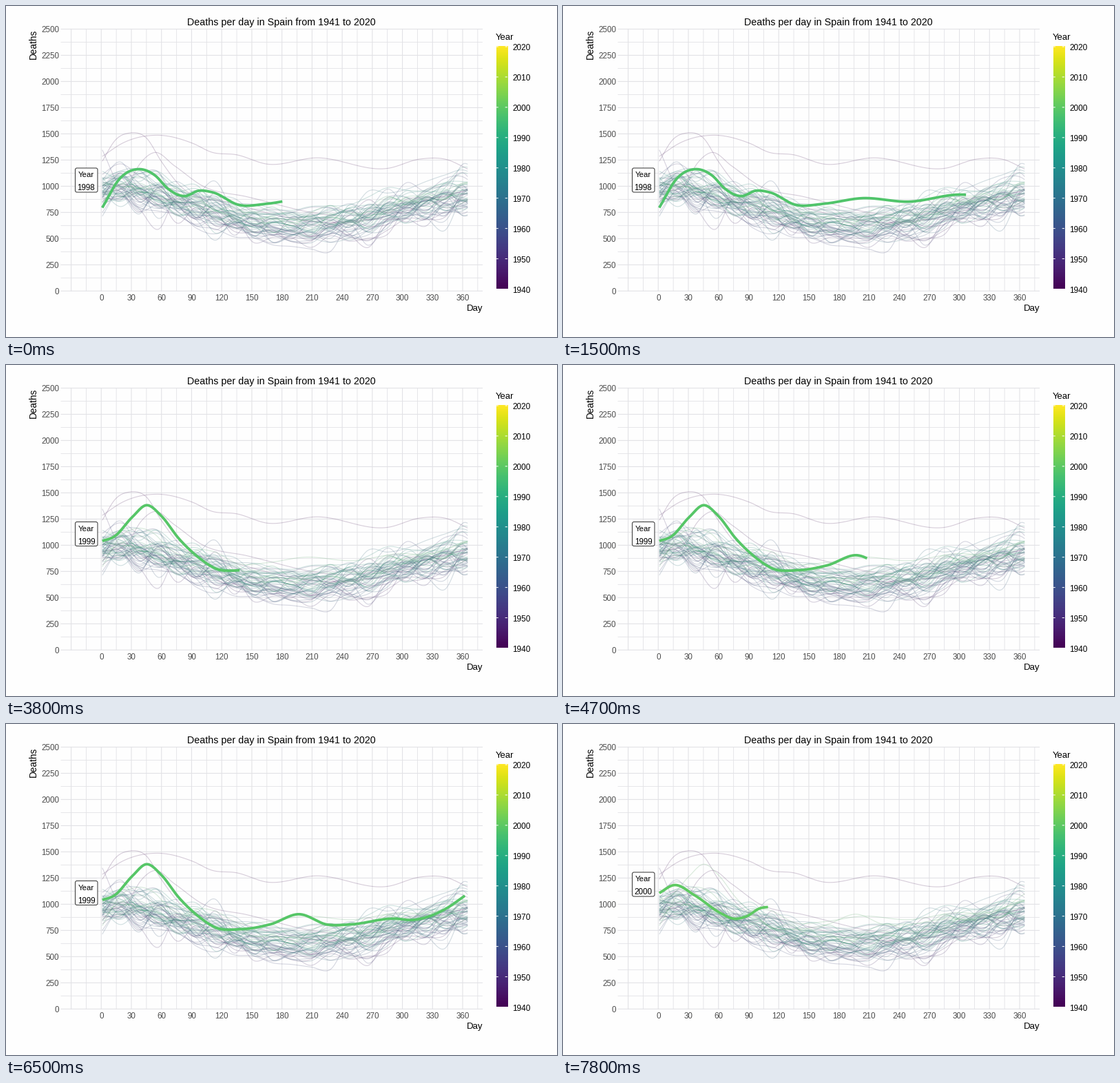
A matplotlib script that plays this animation: 800x480 px, repeating every 8 s.

```python
import numpy as np
import matplotlib.pyplot as plt
from matplotlib.animation import FuncAnimation
from matplotlib.collections import LineCollection
from matplotlib.patches import FancyBboxPatch

W, H, DPI = 800, 480, 100
PT = 72 / DPI                      # one pixel in points
LEFT, RIGHT, TOP, BOTTOM = 80, 691.5, 33.5, 413.3
BAR_LEFT, BAR_RIGHT, BAR_TOP, BAR_BOTTOM = 711.5, 728, 59, 410.5
FRAMES, INTERVAL = 80, 100
START_DAY, DAYS_PER_STEP = 180.4, 14.02
FIRST_YEAR, HERO_YEAR = 1941, 1998
GRID = "#e2e2e6"

plt.rcParams["font.family"] = "Liberation Sans"
viridis = plt.get_cmap("viridis")
days = np.arange(1, 366)


def px(day):
    return 138.3 + np.asarray(day) * 1.4575


def py(deaths):
    return BOTTOM - np.asarray(deaths) * 0.15192


def year_color(year):
    return np.array(viridis((year - 1940) / 80)[:3])


def faded(year):
    return (*(0.65 * year_color(year) + 0.35 * 0.45), 0.24)


def smooth(points, at=days):
    """Cubic Hermite curve through (day, deaths) points."""
    x, y = np.array(points, float).T
    m = np.gradient(y, x)
    i = np.clip(np.searchsorted(x, at, side="right") - 1, 0, len(x) - 2)
    h = x[i + 1] - x[i]
    t = (at - x[i]) / h
    return ((1 + 2 * t) * (1 - t) ** 2 * y[i] + t * (1 - t) ** 2 * h * m[i]
            + t * t * (3 - 2 * t) * y[i + 1] + t * t * (t - 1) * h * m[i + 1])


# Key points of the highlighted years
HEROES = {
    1998: [(1, 795), (18, 1068), (37, 1163), (54, 1100), (66, 980), (83, 906),
           (97, 957), (111, 942), (137, 822), (165, 833), (203, 886),
           (250, 853), (298, 920), (325, 915), (365, 1035)],
    1999: [(1, 1041), (13, 1083), (31, 1270), (45, 1382), (60, 1278),
           (77, 1067), (97, 883), (114, 778), (138, 761), (169, 810),
           (197, 905), (225, 806), (248, 807), (292, 863), (310, 850),
           (341, 945), (365, 1100)],
    2000: [(1, 1107), (16, 1183), (36, 1087), (62, 916), (75, 863), (88, 885),
           (101, 960), (115, 975), (240, 800), (365, 1000)],
}
# The early years that stand out above the rest
OUTLIERS = {
    1941: [(1, 1285), (22, 1415), (56, 1487), (91, 1410), (110, 1325),
           (135, 1300), (165, 1212), (214, 1271), (286, 1172), (318, 1260),
           (344, 1255), (365, 1165)],
    1942: [(1, 1238), (14, 1440), (28, 1508), (45, 1460), (60, 1235),
           (77, 1020), (130, 840), (235, 650), (365, 930)],
    1943: [(1, 940), (27, 1030), (39, 1220), (53, 1322), (73, 1195),
           (101, 1003), (145, 900), (235, 720), (365, 960)],
}
winter = 0.5 + 0.5 * np.cos(2 * np.pi * (days - 15) / 365)
season = 595 + 300 * winter + 70 * np.exp(-((days - 25) / 35) ** 2)


def random_year(year):
    """Season plus a slow trend, a level of its own and a smooth wobble."""
    rng = np.random.default_rng(year)
    knots = np.linspace(0, 380, 21)
    wobble = smooth(np.column_stack([knots, rng.normal(0, 1, knots.size)]))
    age = (year - FIRST_YEAR) / 57
    level = 130 * (age - 0.5) * (1 - 0.6 * winter) + rng.normal(0, 58)
    return season + level + wobble * (40 + 32 * winter + 20 * (1 - age))


def year_curve(year):
    points = HEROES.get(year) or OUTLIERS.get(year)
    return smooth(points) if points else random_year(year)


def path(year):
    return np.column_stack([px(days), py(year_curve(year))])


years = range(FIRST_YEAR, HERO_YEAR + 2)
paths = [path(y) for y in years]
colors = [faded(y) for y in years]
label_y = {1998: 252.5, 1999: 245, 2000: 232.5}

fig = plt.figure(figsize=(W / DPI, H / DPI), dpi=DPI, facecolor="#fefefe")
ax = fig.add_axes([0, 0, 1, 1])
ax.axis("off")


def text(x, y, s, size, color="black", ha="center", va="center_baseline", **kw):
    return ax.text(x, y, s, fontsize=size * PT, color=color, ha=ha, va=va, **kw)


def rule(x, y, major):
    ax.plot(x, y, color=GRID, lw=(1.1 if major else 0.85) * PT,
            snap=False, zorder=1)


# Grid and axes
for day in range(-30, 376, 15):
    rule([px(day)] * 2, [TOP, BOTTOM], day % 30 == 0)
for deaths in range(0, 2501, 125):
    rule([LEFT, RIGHT], [py(deaths)] * 2, deaths % 250 == 0)
for day in range(0, 361, 30):
    text(px(day), 422.5, str(day), 11.6, "#4d4d4d")
for deaths in range(0, 2501, 250):
    text(77, py(deaths) + 0.5, str(deaths), 11.6, "#4d4d4d", ha="right")
text(400, 22.8, "Deaths per day in Spain from 1941 to 2020", 14.3)
text(692, 437.5, "Day", 13.3, ha="right")
text(40, 34, "Deaths", 13.6, va="top", rotation=90)

# Colour bar
text(711, 44.5, "Year", 13.3, ha="left")
ax.imshow(np.linspace(1, 0, 256)[:, None], cmap=viridis, aspect="auto",
          extent=(BAR_LEFT, BAR_RIGHT, BAR_BOTTOM, BAR_TOP),
          interpolation="bilinear")
for year in range(1940, 2021, 10):
    y = BAR_BOTTOM - (year - 1940) / 80 * (BAR_BOTTOM - BAR_TOP)
    for x in (BAR_LEFT, BAR_RIGHT - 3.3):
        ax.plot([x, x + 3.3], [y, y], color="white", lw=PT,
                solid_capstyle="butt", snap=False)
    text(735, y + 0.5, str(year), 11.8, ha="left")
ax.set_xlim(0, W)
ax.set_ylim(H, 0)

# Moving parts
history = LineCollection([], linewidths=1.1 * PT, zorder=2)
ax.add_collection(history, autolim=False)
hero, = ax.plot([], [], lw=3.8 * PT, solid_capstyle="butt",
                solid_joinstyle="round", zorder=3)
box = FancyBboxPatch((100.5, 0), 32.5, 35, boxstyle="round,pad=0,rounding_size=2.5",
                     fc="white", ec="#333333", lw=PT, zorder=4)
ax.add_patch(box)
word = text(116.5, 0, "Year", 11.4, zorder=5)
number = text(116.5, 0, "", 11.6, zorder=5)


def draw(i):
    step = int((i + 0.5) * 0.6)    # six steps a second on a 100 ms clock
    passed, day = divmod(START_DAY + step * DAYS_PER_STEP, 365)
    year = HERO_YEAR + int(passed)
    done = year - FIRST_YEAR
    history.set_segments(paths[:done])
    history.set_color(colors[:done])
    shown = np.append(days[days < day], day)
    hero.set_data(px(shown), py(smooth(HEROES[year], shown)))
    hero.set_color(year_color(year))
    y = label_y[year]
    box.set_y(y - 17.5)
    word.set_y(y - 8)
    number.set_y(y + 10)
    number.set_text(str(year))
    return history, hero, box, word, number


anim = FuncAnimation(fig, draw, frames=FRAMES, interval=INTERVAL,
                     repeat=True, repeat_delay=0, blit=False)
plt.show()
```
